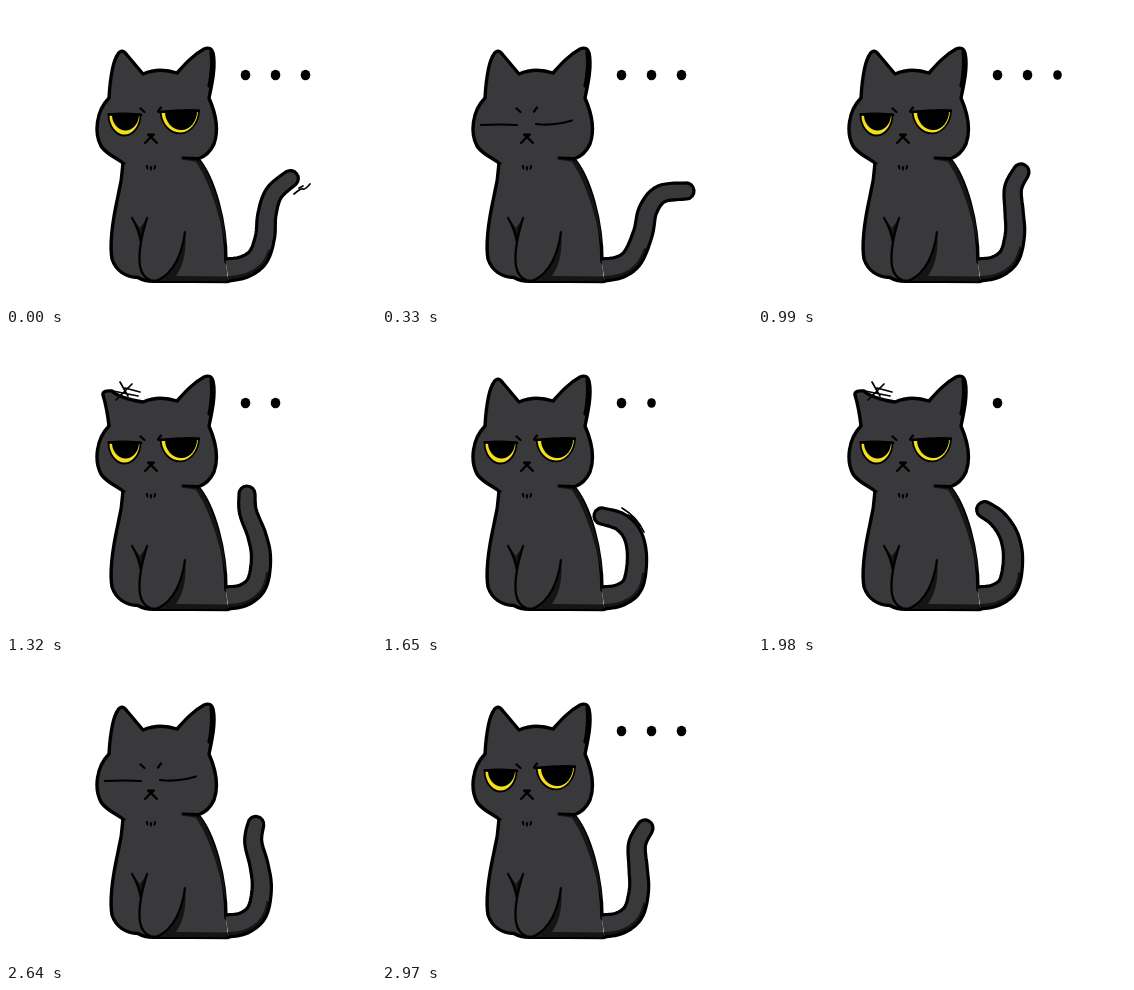
These frames come from a looping animation (370 by 300 pixels, 3300 ms). An HTML page:

```html
<!DOCTYPE html>
<html lang="en">
<head>
<meta charset="utf-8">
<title>Unimpressed cat</title>
<style>
html, body { margin: 0; width: 100%; height: 100%; overflow: hidden; background: #fff; }
svg { display: block; width: 100vw; height: 100vh; }
.line { fill: none; stroke: #000; stroke-width: 2.2; stroke-linecap: round; stroke-linejoin: round; }
.fur { fill: #39393b; stroke: #000; stroke-width: 3.4; stroke-linejoin: round; stroke-linecap: round; }
.shade { fill: #151516; }
.iris { fill: #f4df1d; stroke: #000; stroke-width: 1.8; }
.thin { stroke-width: 1.7; }
</style>
</head>
<body>
<svg viewBox="0 0 370 300">
  <path class="fur" d="M222 275.5L152 275C142 276 136 274 132 271.500C120 271 110 265 106 253C103 235 108 208 112 190Q116 174 117 157L150 140L192 153C208 172 220 215 220 256"/>
  <path class="shade" d="M176 150L192 152C207 170 219 212 220 240C214 212 205 178 190 156Q182 154 176 154Z"/>
  <path class="shade" d="M179 226C181 246 177 260 170 270L222 270.500V275H152C168 268 176 248 179 226Z"/>
  <path class="shade" d="M126 212L134 222L141 212L135 240Q132 226 126 212Z"/>
  <path class="line" d="M126 212Q133 223 135 236M141 212C136 228 132 246 134 260Q136 271 144 274M179 226C176 250 166 268 152 274"/>
  <path id="tailFill" fill="#39393b"/>
  <path id="tailShade" fill="none" stroke="#151516" stroke-width="4"/>
  <path id="tailEdge" class="line" style="stroke-width:3.200"/>
  <path id="head" class="fur"/>
  <path class="line" style="stroke-width:3.200" d="M205 46Q207 60 203 80M177 152L192 152.500"/>
  <path class="line" d="M134.500 102.500L138.500 106M155 101.500L152 105.500M142 128.500H148L145 131.500ZM139 137L145 131L151 137"/>
  <path class="line" style="stroke-width:2" d="M141 160L141.500 162.500M145 161V163.500M149 160L148.500 162.500"/>
  <g id="open">
    <path class="iris" d="M102.500 108.500H134.500A16 21 0 0 1 102.500 108.500Z"/>
    <path d="M106 108.500H133A13.500 16 0 0 1 106 108.500Z"/>
    <path class="iris" d="M154.500 106L193 105A19.300 23.500 0 0 1 154.500 106Z"/>
    <path d="M159 106L191 105A16 18.500 0 0 1 159 106Z"/>
    <path class="line" style="stroke-width:2.600" d="M103 108.500Q118 107 135 109M154 106Q172 104 193 104.500"/>
  </g>
  <path id="shut" class="line" d="M99 119Q118 118 135 119M154 118Q172 120 190 114.500"/>
  <path id="scribble" class="line thin" d="M114 48L122 62M126 50L110 66M107 57L132 62M119 54L134 58"/>
  <path id="swish" class="line thin"/>
  <g id="dots"></g>
</svg>
<script>
const STEP = 330, COUNT = 10;
const el = id => document.getElementById(id);
const set = (id, d) => el(id).setAttribute("d", d);
const show = (node, on) => node.setAttribute("visibility", on ? "visible" : "hidden");
const mix = (a, b, t) => a + (b - a) * t;

// Tail key poses from curled to fully stretched, middle to tip
const poses = [
  [[251, 250], [255, 224], [251, 202], [239, 188], [220, 182]],
  [[251, 249], [255, 224], [251, 202], [242, 178], [241, 160]],
  [[252, 251], [259, 231], [261, 208], [268, 187], [285, 172]],
  [[251, 251], [261, 227], [266, 204], [279, 188], [304, 185]]
];
const root = [[221, 264], [238, 261]];

// How far the tail is through the poses at each step
const sway = [2, 3, 1.95, 1.5, 1, 0, 0.3, 1, 1.2, 1.5];

const swishes = {
  0: "M288 188Q295 182 297 183T304 178M293 182L297 180",
  2: "M249 184Q250 177 258 169M253 167L258 162M257 171L263 164",
  5: "M240 174Q255 183 262 198M246 181Q254 185 258 192",
  7: "M253 153Q257 157 255 162"
};

const ears = [
  "Q105 58 112 48Q116 42 121 49L137 68",
  "Q101 74 97 61Q96 56 106 57Q113 64 137 68"
];
const leftCheek = "M117 157C109 151 100 148 95 140C88 127 90 105 103 92";
const rightSide = "Q153 61 171 67C179 58 187 49 198 43Q205 40 207 47C210 60 206 78 203 92C210 108 213 124 208 138Q203 149 192 153";

function tailPoints(amount) {
  const i = Math.min(Math.floor(amount), poses.length - 2);
  const moved = poses[i].map(([x, y], k) => {
    const [x2, y2] = poses[i + 1][k];
    return [mix(x, x2, amount - i), mix(y, y2, amount - i)];
  });
  return [...root, ...moved];
}

// Catmull-Rom curve through the points
function spline(points, u) {
  const last = points.length - 1;
  const i = Math.min(Math.floor(u * last), last - 1);
  const t = u * last - i;
  const p = k => points[Math.max(0, Math.min(last, k))];
  return [0, 1].map(n => {
    const a = p(i - 1)[n], b = p(i)[n], c = p(i + 1)[n], d = p(i + 2)[n];
    return b + 0.5 * t * (c - a + t * (2 * a - 5 * b + 4 * c - d + t * (3 * (b - c) + d - a)));
  });
}

const toPath = list => list.map(([x, y]) => x.toFixed(1) + " " + y.toFixed(1)).join("L");

function drawTail(amount) {
  const points = tailPoints(amount);
  const inner = [], outer = [], shade = [];
  const base = 11.2, tip = 8, count = 48;
  for (let i = 0; i <= count; i++) {
    const u = i / count;
    const [x, y] = spline(points, u);
    const [ax, ay] = spline(points, Math.max(0, u - 0.01));
    const [bx, by] = spline(points, Math.min(1, u + 0.01));
    const len = Math.hypot(bx - ax, by - ay);
    const r = mix(base, tip, u);
    const side = k => [x + (by - ay) / len * k, y + (ax - bx) / len * k];
    // The edge nearest the body is the left side of the curve
    inner.push(side(r));
    outer.push(side(-r));
    if (u < 0.42) shade.push(side(3 - r - 3 * u));
  }
  const edge = "M" + toPath(inner) + `A${tip} ${tip} 0 0 1 ` + toPath(outer.reverse());
  set("tailFill", edge + "Z");
  set("tailEdge", edge);
  set("tailShade", "M" + toPath(shade));
}

const dots = [0, 1, 2].map(i => {
  const dot = document.createElementNS("http://www.w3.org/2000/svg", "ellipse");
  dot.setAttribute("cx", 239.5 + 30 * i);
  dot.setAttribute("cy", 69);
  return el("dots").appendChild(dot);
});

// All three dots hold for five steps, then one goes every second step
const dotCount = step => 3 - Math.ceil(Math.max(0, (step + 1) % COUNT - 4) / 2);

function drawDots(step) {
  dots.forEach((dot, i) => {
    // A dot shrinks a little just before it goes
    const r = i < dotCount(step + 1) ? 4.8 : 4.3;
    dot.setAttribute("rx", r);
    dot.setAttribute("ry", r + 0.5);
    show(dot, i < dotCount(step));
  });
}

function draw(step) {
  const shut = step === 1 || step === 8;
  const folded = step === 4 || step === 6;
  drawTail(sway[step]);
  drawDots(step);
  set("head", leftCheek + ears[+folded] + rightSide);
  set("swish", swishes[step] || "");
  show(el("open"), !shut);
  show(el("shut"), shut);
  show(el("scribble"), folded);
}

const start = performance.now();
let shown = -1;
function tick(now) {
  const step = Math.floor(Math.max(0, now - start) / STEP) % COUNT;
  if (step !== shown) draw(shown = step);
  requestAnimationFrame(tick);
}
tick(start);
</script>
</body>
</html>
```
